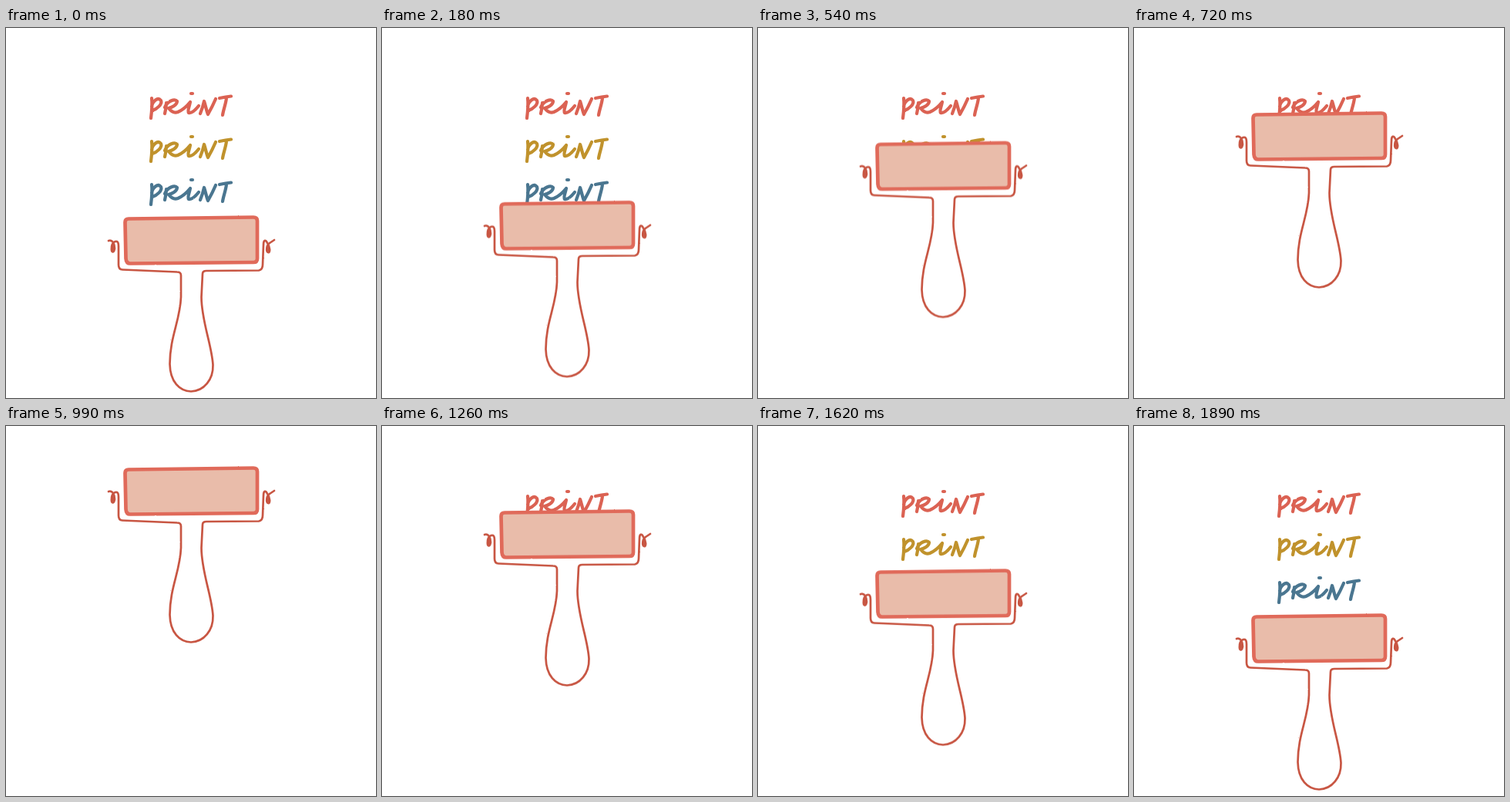
Animation of 480 by 480 pixels, one loop 1.98 s. Source, as an HTML page:

```html
<!DOCTYPE html>
<html lang="en">
<head>
<meta charset="utf-8">
<title>Print roller</title>
<style>
  html, body { margin: 0; width: 100%; height: 100%; overflow: hidden; background: #fff; }
  svg { display: block; width: 100%; height: 100%; }
  path { stroke-linecap: round; stroke-linejoin: round; }
  .word { fill: none; stroke-width: 4.2; }
  .red { stroke: #db6253; }
  .gold { stroke: #c0922c; }
  .blue { stroke: #4a7690; }
  .frame { fill: none; stroke: #c85643; stroke-width: 2.7; }

  .roller { animation: roll 1980ms infinite; }

  /* Moves in 90 ms ticks: a rest, nine even steps, the top, and back */
  @keyframes roll {
    0% { transform: translateY(0); animation-timing-function: step-end; }
    4.5454% { transform: translateY(0); animation-timing-function: steps(9, end); }
    45.4545% { transform: translateY(-173.7px); animation-timing-function: step-end; }
    50% { transform: translateY(-191px); animation-timing-function: step-end; }
    54.5454% { transform: translateY(-173.7px); animation-timing-function: steps(9, end); }
    95.4545%, 100% { transform: translateY(0); }
  }
</style>
</head>
<body>
<svg viewBox="0 0 480 480" role="img" aria-label="PRINT PRINT PRINT">
  <defs>
    <filter id="rough" filterUnits="userSpaceOnUse" x="0" y="0" width="480" height="480"
            color-interpolation-filters="sRGB">
      <feTurbulence type="fractalNoise" baseFrequency="0.3" numOctaves="2" seed="4"/>
      <feDisplacementMap in="SourceGraphic" scale="1.5" xChannelSelector="R" yChannelSelector="G"/>
    </filter>
    <g id="print">
      <!-- P -->
      <path d="M189 91C190 99 189 109 188 117M189 102C190 95 197 89 201 94C203 99 196 105 190 107"/>
      <!-- R, running into the i -->
      <path d="M208 97C208 102 207 107 206 111M206 103C209 95 219 91 222 95C222 100 215 103 211 104
               C214 108 218 111 223 109C230 106 235 101 239 96C238 102 235 107 237 110
               C241 111 246 106 250 101"/>
      <path d="M240 85L242 85"/>
      <!-- N -->
      <path d="M252 111C254 106 256 100 257 95C259 101 260 107 262 112C266 105 269 99 272 92"/>
      <!-- T -->
      <path d="M277 91C282 90 288 89 292 88.500M286 91C285 99 282 106 281 113"/>
    </g>
  </defs>

  <g class="word" filter="url(#rough)">
    <use href="#print" class="red"/>
    <use href="#print" class="gold" y="56"/>
    <use href="#print" class="blue" y="112"/>
  </g>

  <g class="roller">
    <!-- hides the words not printed yet -->
    <rect y="260" width="480" height="480" fill="#fff"/>
    <g filter="url(#rough)">
      <path fill="#e9bcaa" stroke="#e06a5a" stroke-width="4.700"
            d="M154.500 252Q154.500 247.500 159 247.500L321 245.500Q326 245.500 326 250L326 299
               Q326 304 321 304L161 305.500Q156 305.500 155.500 299Z"/>
      <path class="frame"
            d="M133 276C138 274 141 280 141 286C140 292 136 292 137 285C137 279 141 276 144 277
               Q146 278 146 283L146 307Q146 313.500 151 313.500L222 316.500Q227 316.500 227 321L227 349
               C226 379 212.500 401 212.500 436C213 459 225 471 240 471.500
               C257 471 269 456 268.500 437C267 411 253.500 380 253.500 349L255 319
               Q255 315 260 315L328 314.500Q333 313.500 333 307L334 281C334 275 337 274 339 279
               C343 284 343 292 340 291C337 290 338 281 342 279L348 275"/>
      <path class="frame" d="M138.500 282L139 289M340 282L340 290"/>
    </g>
  </g>
</svg>
</body>
</html>
```
